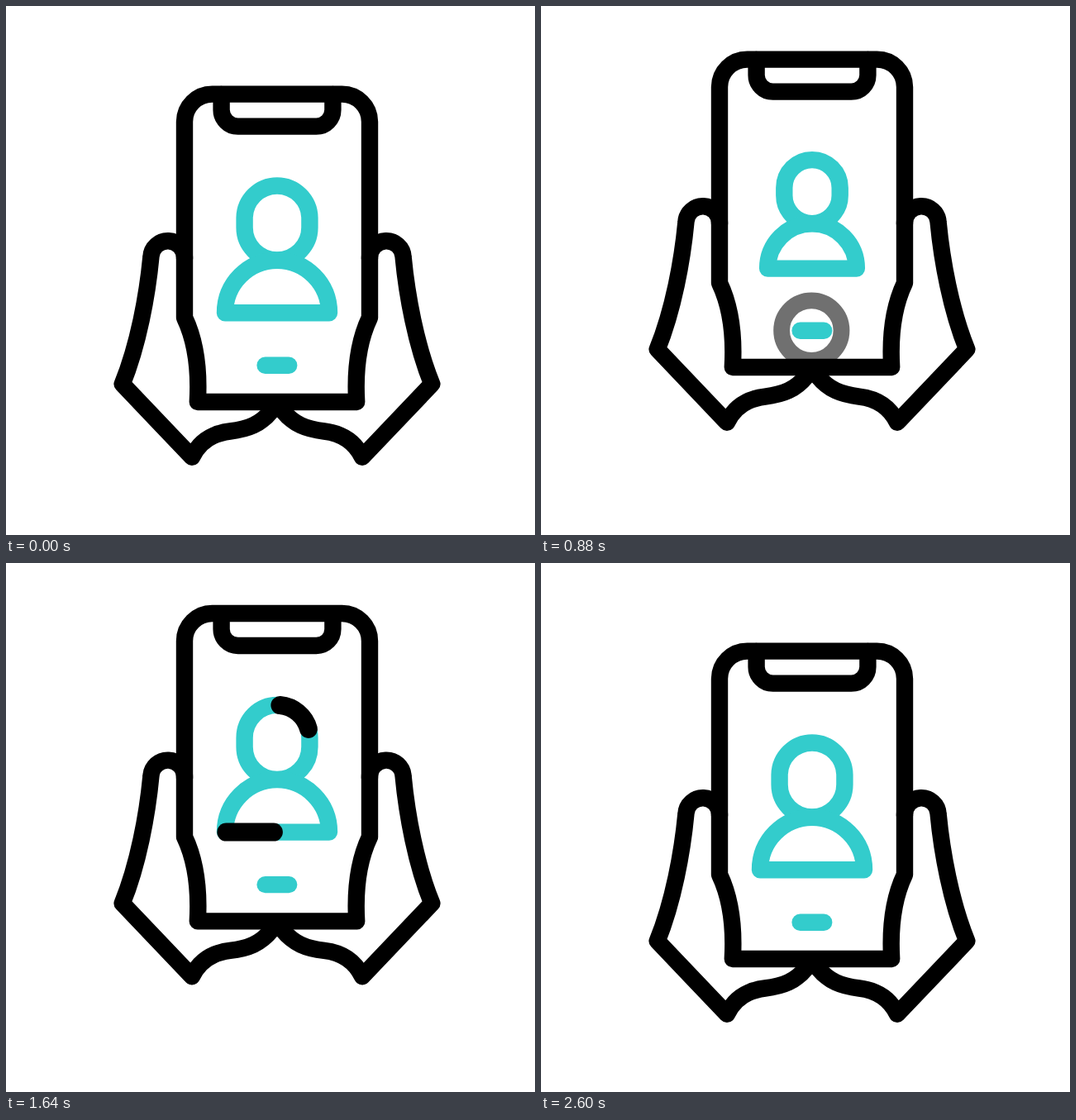
Recreate the animation shown at these times as an HTML page. Size 640 by 640 pixels, loop 2.62 s.

```html
<!DOCTYPE html>
<html lang="en">
<head>
<meta charset="utf-8">
<title>Phone in hands</title>
<style>
  html, body { margin: 0; width: 100%; height: 100%; overflow: hidden; background: #fff; }
  svg { display: block; width: 100vw; height: 100vh; }
  path, circle { fill: none; stroke-linecap: round; stroke-linejoin: round; }
  .ink { stroke: #000; stroke-width: 20.4; }
  .teal { stroke: #3cc; }
  .dash { stroke: #000; }
</style>
</head>
<body>
<svg viewBox="0 0 640 640">
  <defs>
    <path id="hand" d="M216 305.5 A20.3 20.3 0 0 0 175.4 303.5 C171 350 160 410 140.7 457.3 L225 545.8 C234 527 250 517 271 514.5 C293 512 308 506 321 490 L328.5 480"/>
    <path id="head" pathLength="1" d="M328 307.5 A39.4 39.5 0 0 0 367.4 268 V257 A39.4 39.5 0 0 0 288.6 257 V268 A39.4 39.5 0 0 0 328 307.5"/>
    <path id="torso" pathLength="1" d="M328 307.7 A63 63.5 0 0 0 265 371.2 H391 A63 63.5 0 0 0 328 307.7"/>
  </defs>
  <g id="scene">
    <circle id="ring" cx="327.3" cy="434.6" stroke="#000" stroke-width="19.8"/>
    <g class="ink">
      <use href="#hand"/>
      <use href="#hand" transform="matrix(-1 0 0 1 656 0)"/>
      <path d="M216 377 V140 A33.5 33.5 0 0 1 249.5 106.6 H406.5 A33.5 33.5 0 0 1 440 140 V377 C430 398 421.5 432 424.2 479 H231.8 C234.5 432 226 398 216 377 Z"/>
      <path d="M260.6 107 V125.5 A20 20 0 0 0 280.6 145.6 H375.4 A20 20 0 0 0 395.4 125.5 V107"/>
    </g>
    <path class="teal" stroke-width="20.4" d="M313.6 434.7 H342.2"/>
    <g id="person">
      <g id="figure" class="teal"><use href="#head"/><use href="#torso"/></g>
      <g id="dashes" class="dash"><use href="#head"/><use href="#torso"/></g>
    </g>
  </g>
</svg>
<script>
  const LOOP = 2620;
  // [time, value] steps, eased between neighbours
  const LIFT = [[0, 0], [1210, -51.3], [1390, -51.3], [2600, 0]];
  const SCALE = [[600, 1], [880, 0.855], [1320, 1.05], [1640, 1]];
  const RADIUS = [[600, 0], [1000, 46]];
  const FADE = [[780, 1], [1000, 0]];

  const el = id => document.getElementById(id);
  const [scene, ring, person, figure, dashes] =
    ['scene', 'ring', 'person', 'figure', 'dashes'].map(el);
  const clamp = x => Math.min(1, Math.max(0, x));
  const smooth = x => x * x * (3 - 2 * x);

  function at(steps, t) {
    let value = steps[0][1];
    for (let i = 1; i < steps.length; i++) {
      const [t0, a] = steps[i - 1], [t1, b] = steps[i];
      if (t >= t0) value = a + (b - a) * smooth(clamp((t - t0) / (t1 - t0)));
    }
    return value;
  }

  function draw(t) {
    scene.setAttribute('transform', `translate(0 ${at(LIFT, t)})`);

    ring.setAttribute('r', at(RADIUS, t));
    ring.setAttribute('opacity', t > 600 ? at(FADE, t) : 0);

    // line weight stays constant while the figure scales
    const s = at(SCALE, t);
    person.setAttribute('transform', `translate(328 291) scale(${s}) translate(-328 -291)`);
    figure.setAttribute('stroke-width', 20.4 / s);
    dashes.setAttribute('stroke-width', 22 / s);

    const tail = clamp((t - 1300) / 1100), front = clamp((t - 1105) / 1100);
    dashes.setAttribute('visibility', front > tail ? 'visible' : 'hidden');
    dashes.setAttribute('stroke-dasharray', `${front - tail} 2`);
    dashes.setAttribute('stroke-dashoffset', -tail);
  }

  const start = performance.now();
  function tick() {
    draw((performance.now() - start) % LOOP);
    requestAnimationFrame(tick);
  }
  tick();
</script>
</body>
</html>
```
